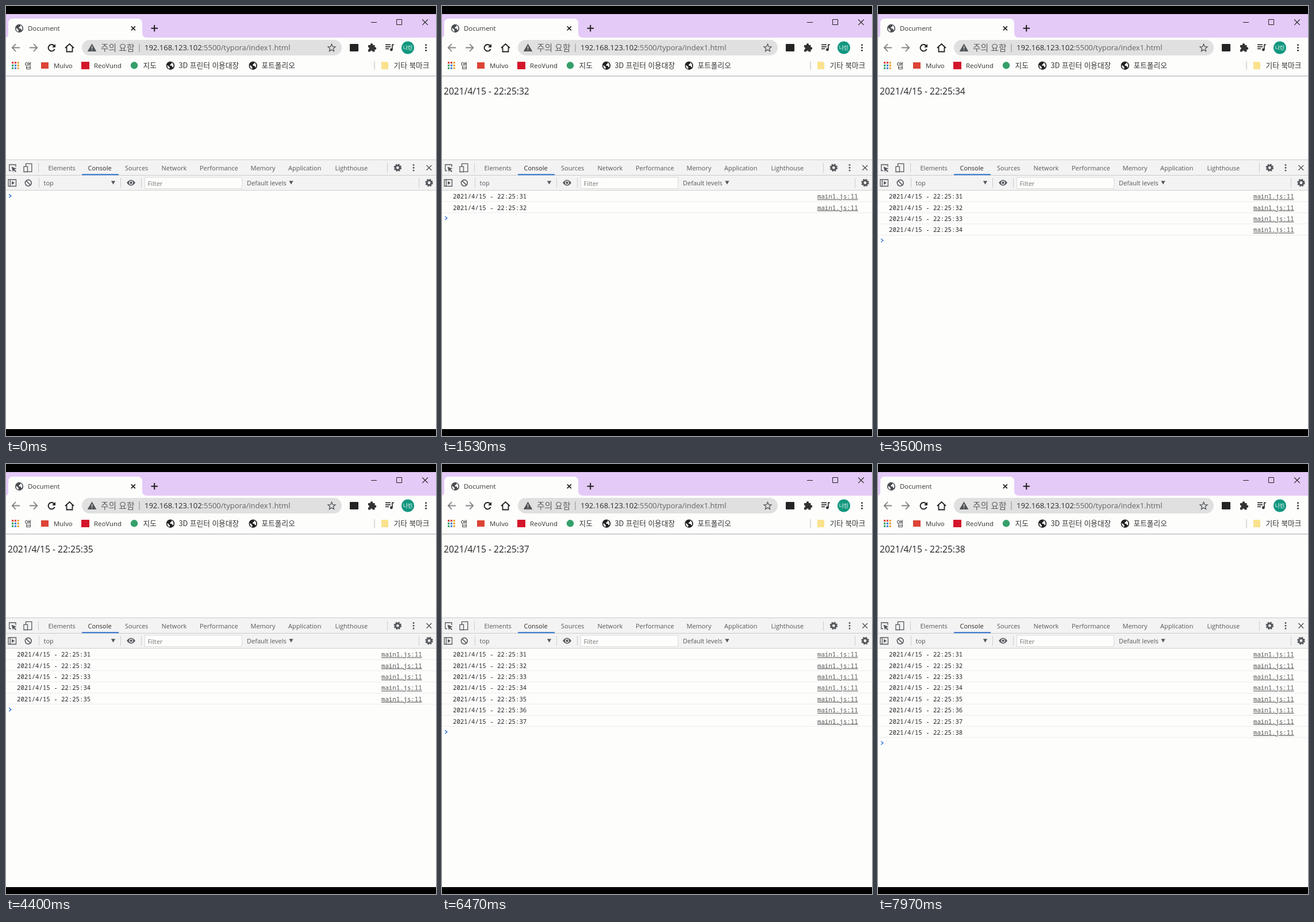
These frames come from a looping animation (748x748 px, 8 s). An HTML page:

```html
<!DOCTYPE html>
<html lang="ko">
<head>
<meta charset="utf-8">
<title>Console clock</title>
<style>
  html, body { margin: 0; width: 100%; height: 100%; overflow: hidden; background: #000; }
  svg { display: block; width: 100%; height: 100%; }
  text { font: 11px "Open Sans", "Noto Sans CJK KR", "Noto Sans CJK", sans-serif; fill: #55585c; white-space: pre; }
  .mark { font-size: 11.4px; fill: #333; }
  .ko { font: 12.7px "Noto Sans CJK KR", "Noto Sans CJK", sans-serif; fill: #333; }
  .log text { font: 10.7px "Noto Sans Mono", "DejaVu Sans Mono", monospace; fill: #2a2a2a; }
  .log .link { fill: #555; text-decoration: underline; }
  .line { fill: none; stroke: currentColor; }
  .sep { stroke: #ccc; }
</style>
</head>
<body>
<svg viewBox="0 0 748 748">
  <defs>
    <g id="globe">
      <circle r="7.2" fill="currentColor"/>
      <path d="M-5.6-1 L-2.5 1.2 -1.2 3 -1.5 5.8 C-4 5-5.7 2.5-5.6-1Z M-1-5.6 L1.8-5.5 2.2-3.4 -.2-2.2 -.5 0 3 .6 3.4 2.8 5 2.6 C6.2 0 5.2-4 2.2-5.4Z" fill="#fdfdfc"/>
    </g>
    <g id="gear" fill="none" stroke="#55585c">
      <circle r="3.9" stroke-width="3"/>
      <circle r="5.7" stroke-width="2.2" stroke-dasharray="2.6 1.877"/>
    </g>
    <g id="dots"><circle cy="-4.7" r="1.5"/><circle r="1.5"/><circle cy="4.7" r="1.5"/></g>
    <path id="cross" d="M-4-4 L4 4 M4-4 L-4 4"/>
    <path id="arrow" d="M7 0 H-6 M0-6.3 L-6.3 0 0 6.3"/>
    <path id="down" d="M-3.6-3 H3.6 L0 3.2Z" fill="#55585c"/>
  </defs>

  <rect y="14" width="748" height="722" fill="#fdfdfc"/>

  <!-- Tab strip -->
  <rect y="14" width="748" height="41" fill="#e4caf7"/>
  <path d="M0 55 Q4 54 4 49 V30 Q4 22 12 22 H229 Q237 22 237 30 V47 Q237 55 245 55Z" fill="#fdfdfc"/>
  <use href="#globe" x="23" y="39" color="#4a4d50"/>
  <text class="mark" x="38" y="42.5">Document</text>
  <g class="line" color="#222">
    <use href="#cross" transform="translate(221.3 38.8) scale(.88)" stroke-width="2"/>
    <path d="M252.5 38.7 H264 M258.2 33 V44.5" stroke-width="2"/>
    <path d="M635 28.5 H645 M679.5 23.5 H688.5 V32.5 H679.5Z"/>
    <use href="#cross" transform="translate(729 28.3) scale(1.2)" stroke-width=".9"/>
  </g>

  <!-- Address bar -->
  <rect x="132" y="59" width="452" height="27" rx="13.5" fill="#e0e0e0"/>
  <g class="line" stroke-width="1.8">
    <use href="#arrow" x="17" y="72.5" color="#858585"/>
    <use href="#arrow" transform="translate(48 72.5) scale(-1 1)" color="#858585"/>
    <g color="#222">
      <path d="M83.6 69 A5.7 5.7 0 1 0 84.6 74.8" stroke-width="2"/>
      <path d="M86 66 V72 H80Z" fill="#222" stroke="none"/>
      <path d="M103 73 L110.5 66 118 73 M105.5 71.5 V79.5 H115.5 V71.5"/>
    </g>
    <path d="M566.5 66.2 L568.3 70.6 573 71 569.4 74 570.6 78.6 566.5 76.1 562.4 78.6 563.6 74 560 71 564.7 70.6Z" color="#55585c" stroke-width="1.3"/>
  </g>
  <path d="M149.5 65.5 L157.3 79 H141.7Z" fill="#505356"/>
  <path d="M149.5 70 V74.5 M149.5 75.8 V77.3" stroke="#e0e0e0" stroke-width="1.4"/>
  <text class="ko" x="165" y="77.5" style="font-size:14.8px;fill:#5c5f63">주의 요함</text>
  <path d="M232 65.5 V80" stroke="#8c8c8c"/>
  <text x="241" y="77.3" style="font-size:13px;fill:#606367"><tspan fill="#2a2a2a">192.168.123.102</tspan>:5500/typora/index1.html</text>
  <rect x="598" y="66" width="15" height="13" rx="1" fill="#242424"/>
  <g fill="#333">
    <path d="M630 68 H634 A2.2 2.2 0 1 1 638 68 H641.5 V71.5 A2.2 2.2 0 1 1 641.5 75.8 V79.5 H637.7 A2 2 0 1 0 633.7 79.5 H630 V75.7 A2 2 0 1 0 630 71.7Z"/>
    <path d="M660 66.5 H669 V68.2 H660Z M660 70 H669 V71.7 H660Z M660 73.5 H666 V75.2 H660Z M671 66.5 H675 V68.2 H672.7 V76 H671Z"/>
    <circle cx="670.3" cy="76" r="2.4"/>
    <use href="#dots" x="730.5" y="72.5"/>
  </g>
  <circle cx="699" cy="72.5" r="11" fill="#12977f"/>
  <text class="ko" x="699" y="75.8" text-anchor="middle" style="font-size:9px;fill:#fff">나린</text>

  <!-- Bookmarks -->
  <g id="apps"></g>
  <text class="ko" x="32.5" y="107.5">앱</text>
  <rect x="61" y="98" width="13" height="11" fill="#dc4436"/>
  <text class="mark" x="83" y="107.5">Mulvo</text>
  <rect x="131" y="97" width="14" height="13" fill="#d3162b"/>
  <text class="mark" x="153" y="107.5">ReoVund</text>
  <circle cx="223" cy="103.3" r="6.2" fill="#34a06a"/>
  <text class="ko" x="238.5" y="107.5">지도</text>
  <use href="#globe" x="286" y="103.7" color="#222"/>
  <text class="ko" x="300.5" y="107.5">3D 프린터 이용대장</text>
  <use href="#globe" x="429.7" y="103.7" color="#222"/>
  <text class="ko" x="444.5" y="107.5">포트폴리오</text>
  <path d="M641 96 V111" stroke="#bbb"/>
  <path d="M653 97 H663 L665 99 V110 H653Z" fill="#fae28c"/>
  <text class="ko" x="674.5" y="107.5">기타 북마크</text>
  <path d="M0 121.8 H748" stroke="#b5b5b8" stroke-width="1.2"/>

  <text id="clock" x="3" y="154" style="font-size:15.6px;fill:#252525"></text>

  <!-- Developer tools -->
  <rect y="267" width="748" height="54" fill="#f3f3f3"/>
  <path class="sep" d="M0 267.5 H748 M0 294.5 H748 M0 320.7 H748 M56.5 273 V290 M663.5 273 V290 M57.5 299 V316 M199.5 299 V316 M235.5 299 V316 M718.5 299 V316"/>
  <path d="M132 293.2 H196" stroke="#2f73cf" stroke-width="2"/>
  <g id="tabs"></g>
  <g class="line" color="#55585c" stroke-width="1.3">
    <path d="M17 280 V276 H5.7 V286.5 H9"/>
    <path d="M9.5 279.5 L18.5 283 14.7 284.3 18 287.6 16.6 289 13.4 285.7 12 289Z" fill="currentColor" stroke="none"/>
    <path d="M34.5 279 V274.3 H44.8 V288.3 H38 M31 279.3 H37.5 V288.5 H31Z"/>
    <use href="#cross" transform="translate(735.8 281.3) scale(1.1)"/>
    <path d="M4 302 H17.5 V313.5 H4Z M7.3 302 V313.5"/>
    <path d="M10 304.5 L15 307.8 10 311Z" fill="currentColor" stroke="none"/>
    <circle cx="38.8" cy="307.8" r="5.4" stroke-width="1.6"/>
    <path d="M35 304 L42.6 311.6" stroke-width="1.6"/>
  </g>
  <use href="#gear" x="681.3" y="281.3"/>
  <use href="#gear" x="736" y="307.5"/>
  <use href="#dots" x="709" y="281.3" fill="#55585c"/>
  <text x="65.5" y="312">top</text>
  <use href="#down" x="186.5" y="307.3"/>
  <path d="M210 307.5 Q217.5 297.5 225 307.5 Q217.5 317.5 210 307.5Z" fill="#55585c"/>
  <circle cx="217.5" cy="307.5" r="2.8" fill="#55585c" stroke="#f3f3f3" stroke-width="1.3"/>
  <rect x="241.5" y="298" width="169" height="19.5" fill="#fdfdfc" stroke="#dcdcdc"/>
  <text x="246.5" y="312.5" style="fill:#777">Filter</text>
  <text x="419" y="312">Default levels</text>
  <use href="#down" x="496" y="307.3"/>

  <g class="log" id="log"></g>
  <path id="prompt" class="line" color="#3b78dc" stroke-width="1.5" d="M5.2 327.3 L8.8 330.3 5.2 333.3"/>
</svg>
<script>
const LOOP = 8000, FIRST_TICK = 385, TICK = 1000, ROW_HEIGHT = 19.37, ROWS = 8;
const byId = id => document.getElementById(id);
const stamp = n => `2021/4/15 - 22:25:${30 + n}`;

const appColors = ['#dc4436', '#dc4436', '#e8a33a', '#35a267', '#4285d6', '#e8a33a', '#35a267', '#4285d6', '#e8a33a'];
byId('apps').innerHTML = appColors.map((color, i) =>
  `<rect x="${10 + i % 3 * 4.8}" y="${97 + Math.floor(i / 3) * 4.8}" width="3.2" height="3.2" fill="${color}"/>`).join('');

const tabs = { Elements: 73.5, Console: 142.5, Sources: 207, Network: 270.5, Performance: 337, Memory: 425.5, Application: 491, Lighthouse: 572.5 };
byId('tabs').innerHTML = Object.entries(tabs).map(([name, x]) =>
  `<text x="${x}" y="286"${name === 'Console' ? ' style="fill:#2a2a2a"' : ''}>${name}</text>`).join('');

byId('log').innerHTML = Array.from({ length: ROWS }, (_, i) => `
  <g transform="translate(0 ${i * ROW_HEIGHT})">
    <text x="19" y="335.3">${stamp(i + 1)}</text>
    <text class="link" x="653" y="335.3">main1.js:11</text>
    <path d="M0 340.3 H748" stroke="#ebebed"/>
  </g>`).join('');
const rows = [...byId('log').children];

const start = performance.now();
function draw() {
  const time = (performance.now() - start) % LOOP;
  const count = Math.min(ROWS, Math.floor((time - FIRST_TICK) / TICK) + 1);
  rows.forEach((row, i) => row.setAttribute('visibility', i < count ? 'visible' : 'hidden'));
  byId('clock').textContent = count ? stamp(count) : '';
  byId('prompt').setAttribute('transform', `translate(0 ${count * ROW_HEIGHT})`);
  requestAnimationFrame(draw);
}
draw();
</script>
</body>
</html>
```
